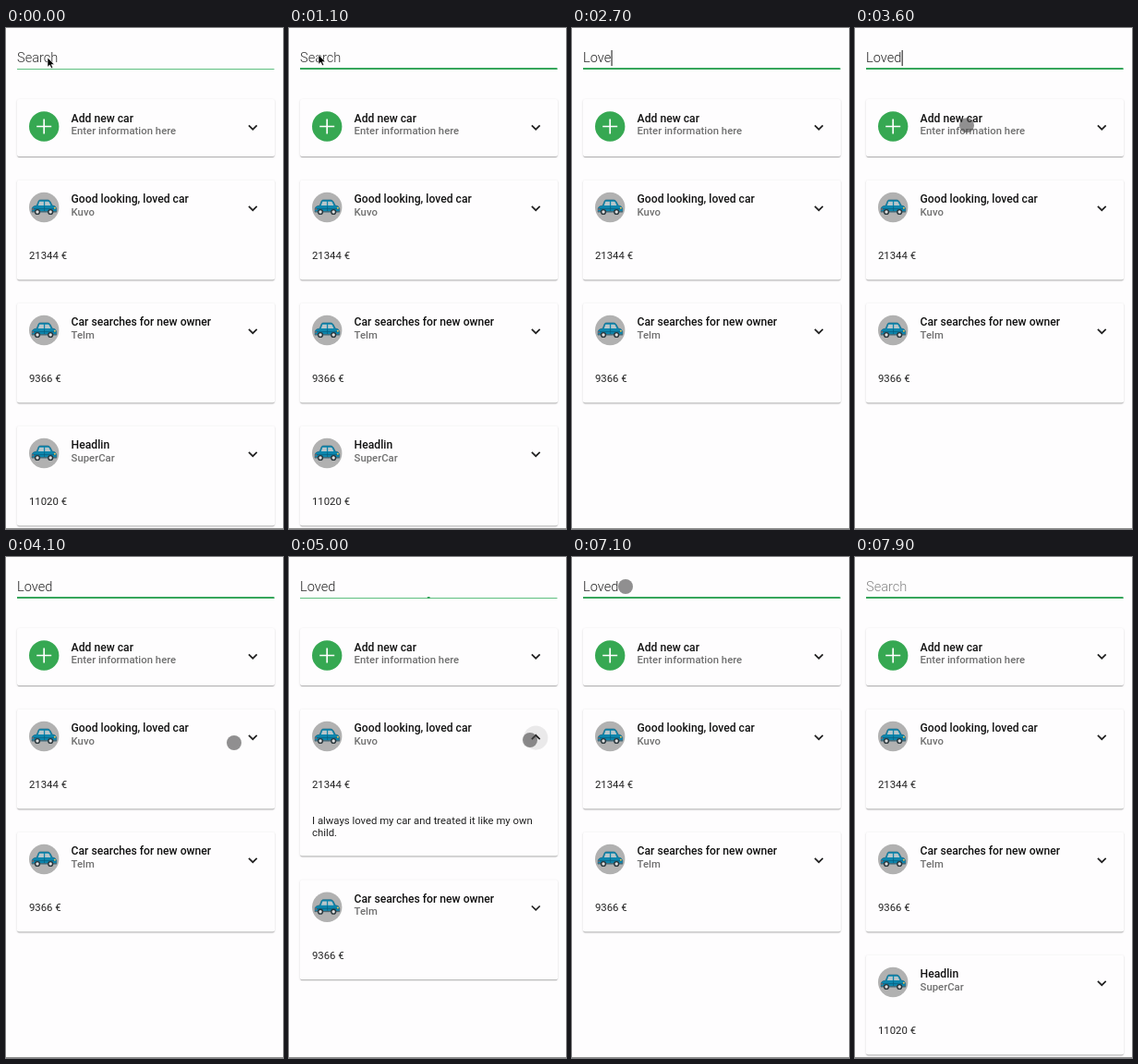
Write an HTML page that moves like this. It is 300 px wide and 542 px high and loops after 8 s.

```html
<!DOCTYPE html>
<html lang="en">
<head>
<meta charset="utf-8">
<title>Car list search</title>
<style>
html, body { margin: 0; width: 100%; height: 100%; overflow: hidden; background: #fefdfe; }
#stage { position: relative; width: 300px; height: 542px; overflow: hidden; font: 11.33px Roboto, sans-serif; }
#stage > svg { position: absolute; left: 0; top: 0; }
svg { display: block; overflow: visible; }
.card {
  position: absolute; left: 12px; top: 0; width: 278.5px; border-radius: 2px;
  background: #fefdfe; overflow: hidden;
  box-shadow: 0 1.6px .8px -.8px rgba(0,0,0,.2), 0 .8px .8px rgba(0,0,0,.14), 0 .8px 2.4px rgba(0,0,0,.14);
}
text { fill: #212121; }
.title { font-size: 12.15px; font-weight: 500; fill: #111; }
.sub { font-weight: 500; fill: #707070; }
.field { font-size: 14.6px; font-weight: 300; }
.chevron { fill: none; stroke: #222; stroke-width: 1.7; }
</style>
</head>
<body>
<div id="stage">
  <svg width="300" height="542">
    <text id="value" class="field" x="12" y="37"></text>
    <rect id="caret" y="24" width="1" height="17" fill="#111"/>
    <rect x="12" y="44" width="278.5" height="1" fill="#5fbf80"/>
    <rect id="focus" y="43" height="2" fill="#37a65c"/>
  </svg>
  <div id="list"></div>
  <svg width="300" height="542">
    <rect y="541" width="300" height="1" fill="#8e8e8e"/>
    <path id="arrow" d="M0 0V10.2L2.4 8 4 11.6 5.7 10.9 4.2 7.4H7.3Z" fill="#000" stroke="#fff" stroke-width=".6"/>
    <circle id="touch" r="8" fill="rgba(70,70,70,.6)"/>
  </svg>
</div>
<script>
const LOOP = 8000, STEP = 100;
const $ = id => document.getElementById(id);

const carIcon = `
  <circle r="16.2" fill="#b1b1b1"/>
  <path d="M-13 5V1Q-12.5-1.5-8-2L-6-7Q-5.5-8-4-8H4Q6-8 7-6L9-2Q13-2 13.5 1.5V5Z"
    fill="#0d86ad" stroke="#14607c" stroke-width=".6"/>
  <path d="M-6.4-2L-4.9-6.3H-.3V-2ZM1-2V-6.3H4.2Q5.3-6.3 5.8-5L7.2-2Z" fill="#b9c6ca"/>
  <path d="M-12.5 1.6H13M.4-1.5V4" stroke="#0a5d7b" stroke-width=".7"/>
  <path d="M-13.4 4.7H13.8" stroke="#56666d" stroke-width="1.1"/>
  <circle cx="11.7" cy=".8" r="1" fill="#e6c45c"/><circle cx="-12" cy="2" r=".8" fill="#d0553f"/>
  <g fill="#ddd" stroke="#27343a" stroke-width="1.4">
    <circle cx="-7.2" cy="5" r="2.4"/><circle cx="7" cy="5" r="2.4"/>
  </g>`;
const plusIcon = `
  <circle r="16.2" fill="#36a852"/>
  <path d="M-8 0H8M0-8V8" stroke="#fff" stroke-width="1.7"/>`;

const cards = [
  { title: 'Add new car', sub: 'Enter information here', icon: plusIcon },
  { title: 'Good looking, loved car', sub: 'Kuvo', price: '21344 €',
    note: ['I always loved my car and treated it like my own', 'child.'] },
  { title: 'Car searches for new owner', sub: 'Telm', price: '9366 €' },
  { title: 'Headlin', sub: 'SuperCar', price: '11020 €' }
];

const label = (cls, x, y, s) => `<text class="${cls}" x="${x}" y="${y}">${s}</text>`;

for (const c of cards) {
  const el = c.el = document.createElement('div');
  el.className = 'card';
  el.innerHTML = `<svg width="278" height="160">
    <g transform="translate(29.2 29.5)">${c.icon || carIcon}</g>
    ${label('title', 58.6, 24.5, c.title)}
    ${label('sub', 58.6, 38.3, c.sub)}
    ${c.price ? label('', 13, 85.5, c.price) : ''}
    <g class="note">${(c.note || []).map((s, i) => label('', 13, 124.5 + i * 13, s)).join('')}</g>
    <circle class="ripple" cx="255.3" cy="31" r="0"/>
    <path class="chevron" d="M-4.4-2.2L0 2.2 4.4-2.2"/>
  </svg>`;
  $('list').append(el);
  c.chevron = el.querySelector('.chevron');
}
const loved = cards[1];
const ripple = loved.el.querySelector('.ripple');
const note = loved.el.querySelector('.note');

const typed = [[0, 'Search'], [1900, 'L'], [2200, 'Lo'], [2400, 'Lov'], [2600, 'Love'], [2900, 'Loved'], [7400, 'Search']];
const caretOn = [[1400, 3400], [3600, 4000], [4300, 4600], [6700, 7100], [7300, 7800]];
const arrowPath = [[0, 45, 32], [400, 43, 32], [800, 33, 30], [1100, 32, 29], [1900, 32, 29]];
const touchPath = [[3300, 34, 31], [3700, 150, 130], [4100, 247, 201], [4500, 261, 198], [5500, 261, 198],
  [5800, 180, 130], [6100, 84, 57], [6500, 58, 32], [7300, 58, 32]];

const clamp = v => Math.min(1, Math.max(0, v));
const ease = v => v * v * (3 - 2 * v);
const ramp = (t, start, len) => ease(clamp((t - start) / len));
const within = (t, spans) => spans.some(([a, b]) => t >= a && t < b);

function follow(el, path, t) {
  const i = path.findIndex(p => p[0] > t);
  el.style.display = i > 0 ? '' : 'none';
  if (i < 1) return;
  const [t0, x0, y0] = path[i - 1], [t1, x1, y1] = path[i];
  const k = (t - t0) / (t1 - t0);
  el.setAttribute('transform', `translate(${x0 + (x1 - x0) * k} ${y0 + (y1 - y0) * k})`);
}

function drawField(t) {
  const text = typed.filter(e => e[0] <= t).pop()[1];
  const empty = text === 'Search';
  const value = $('value');
  value.textContent = text;
  value.style.fill = !empty ? '#222' : t < 1900 ? '#333' : '#858585';
  $('caret').setAttribute('x', empty ? 12 : 12 + value.getComputedTextLength() + .3);
  $('caret').style.display = within(t, caretOn) ? '' : 'none';

  const w = 278.5 * (ramp(t, 800, 260) - ramp(t, 4680, 340) + ramp(t, 6600, 260));
  $('focus').setAttribute('x', 151.25 - w / 2);
  $('focus').setAttribute('width', w);
}

function drawCards(t) {
  const open = ramp(t, 4700, 240) - ramp(t, 5500, 240);
  let y = 77;
  for (const c of cards) {
    const h = c.price ? 107.5 + (c === loved ? 51.7 * open : 0) : 62;
    c.el.style.height = h + 'px';
    c.el.style.transform = `translateY(${y}px)`;
    c.chevron.setAttribute('transform', `translate(255.3 30.5) rotate(${c === loved ? 180 * open : 0})`);
    y += h + 25.5;
  }
  note.style.opacity = open;
  cards[3].el.style.display = within(t, [[2200, 7400]]) ? 'none' : '';

  ripple.setAttribute('r', 17.5 * clamp((t - 4700) / 400));
  const alpha = t < 5900 ? .08 : .045 * (1 - ramp(t, 6600, 200));
  ripple.setAttribute('fill', `rgba(0,0,0,${alpha})`);
}

function draw(now) {
  const t = Math.floor(now % LOOP / STEP) * STEP;
  drawField(t);
  drawCards(t);
  follow($('arrow'), arrowPath, t);
  follow($('touch'), touchPath, t);
}

const start = performance.now();
function tick() {
  draw(performance.now() - start);
  requestAnimationFrame(tick);
}
tick();
</script>
</body>
</html>
```
